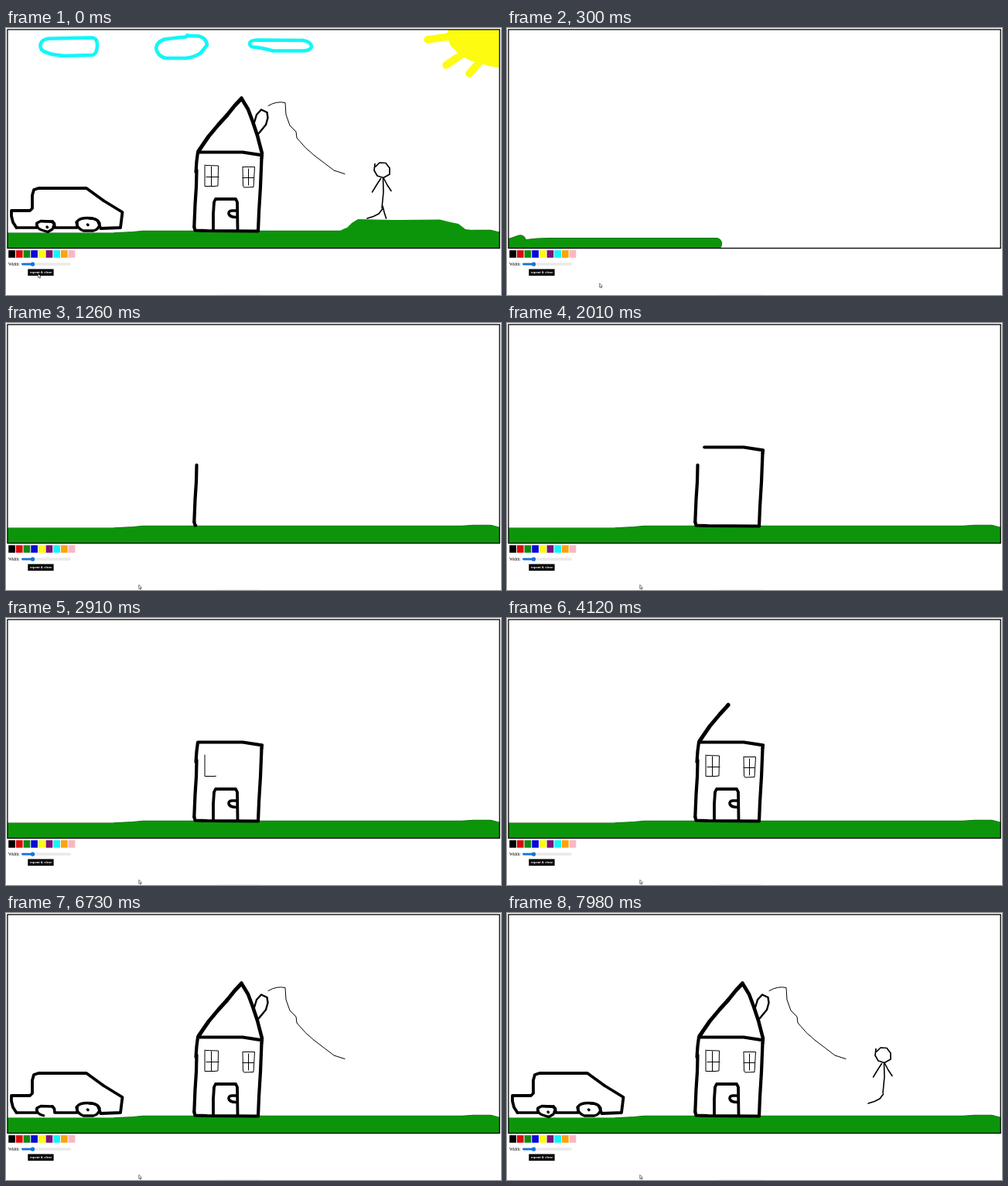
An HTML page that plays this animation: 640x345 px, repeating every 8 s.

```html
<!DOCTYPE html>
<html lang="en">
<head>
<meta charset="utf-8">
<title>Drawing replay</title>
<style>
  html, body { margin: 0; width: 100%; height: 100%; overflow: hidden; background: #fff; }
  svg { display: block; width: 100vw; height: 100vh; }
  .pen { fill: none; stroke-linecap: round; stroke-linejoin: round; }
</style>
</head>
<body>
<svg viewBox="0 0 640 345">
  <defs><clipPath id="sheet"><rect x="2" y="2" width="636" height="282.5"/></clipPath></defs>
  <rect width="640" height="345" fill="#fff"/>
  <g clip-path="url(#sheet)">
    <g id="edge" class="pen" stroke="#075c07" stroke-width="15.6"></g>
    <g id="grass" class="pen" stroke="#0c950a" stroke-width="14.6"></g>
    <g id="ink" class="pen" stroke="#000"></g>
    <g id="extras" class="pen">
      <path fill="#0c950a" d="M432 268V262Q437 259 441 258L447 252 455 247 500 248 561 247.5 575 251 585 253 594 260 608 261.500 638 263V270Z"/>
      <path stroke="#000" stroke-width="1.6" d="M487 230L489 238 491.500 246"/>
      <g stroke="#12f6f8" stroke-width="4.6">
        <path d="M46 18Q49 13 62 13.500L111 12.500Q118 13 118 22Q118 33 112 35L75 36Q52 34 46 28Q43 23 46 18Z"/>
        <path d="M241 10.500L234 9.500Q236 12 226 12L205 14.500Q195 18 194 26Q196 37 207 39L233 39Q246 37 252 32L260 22Q259 13 249 10.500L236 10"/>
        <path d="M315 20Q315 16 325 15.500L384 16Q395 18 395 24Q394 29 385 29.500L345 29.500Q329 25 319 24.500Q315 23 315 20Z"/>
      </g>
      <g stroke="#fcfb10" stroke-width="9.500">
        <path fill="#fcfb10" stroke-width="3" d="M574 0L571 10 576 22 585 31 599 40 614 44 626 48 640 50V0Z"/>
        <path d="M545 15L574 11M569 48L594 31M599 59L614 42"/>
      </g>
    </g>
  </g>
  <rect x="1.900" y="2" width="636.300" height="282.500" fill="none" stroke="#000" stroke-width="1.300"/>
  <g id="swatches"></g>
  <text x="3" y="306.800" font-size="5.400" font-family="'Liberation Serif', serif">Width:</text>
  <rect x="20.300" y="303.900" width="63" height="2.400" rx="1.200" fill="#efefef" stroke="#c4c4c4" stroke-width=".4"/>
  <rect x="20" y="303.700" width="15" height="2.800" rx="1.400" fill="#1474dc"/>
  <circle cx="34.500" cy="305.200" r="2.600" fill="#1474dc"/>
  <rect x="28.300" y="311.500" width="33.300" height="8.600" fill="#000"/>
  <text x="45" y="317.300" font-size="4.300" font-weight="700" text-anchor="middle" fill="#fff" font-family="'Liberation Sans', sans-serif">repeat &amp; clear</text>
  <path d="M273 344.700H330" stroke="#e6e6e6" stroke-width=".6"/>
  <path id="cursor" d="M0 0V5.200L1.200 4.100 2 6 2.900 5.600 2.100 3.800 3.700 3.700Z" fill="#fff" stroke="#222" stroke-width=".6"/>
</svg>
<script>
const LOOP = 8000, CLEAR = 150, STEP = 50;
const $ = id => document.getElementById(id);

function add(parent, tag, attrs) {
  const el = document.createElementNS('http://www.w3.org/2000/svg', tag);
  for (const k in attrs) el.setAttribute(k, attrs[k]);
  return parent.appendChild(el);
}

['#000', '#d90d0d', '#118a11', '#0808dc', '#fcfb10', '#7a117a', '#12f6f8', '#fca40a', '#fbb6c4']
  .forEach((fill, i) => add($('swatches'), 'rect', { x: 3.2 + i * 9.68, y: 287.2, width: 8.7, height: 9.6, fill }));

// Each stroke is drawn along its path between two times.
const strokes = [];
function stroke(parent, d, from, to, width) {
  const el = add(parent, 'path', width ? { d, 'stroke-width': width } : { d });
  strokes.push({ el, from, to, len: el.getTotalLength() });
}
const ink = (width, from, to, d) => stroke($('ink'), d, from, to, width);
function ground(from, to, d) {
  stroke($('edge'), d, from, to);
  stroke($('grass'), d, from, to);
}

// ground
ground(150, 550, 'M17 275L10 277.500 0 281 28 280.500 40 279.200 55 278.700H617L630 277 641 278.500');
ground(555, 1030, 'M641 278L638 271.700 626 268.600H605L590 269.500H178L165 270.700 140 272 0 272.300');

// walls and door
ink(4.2, 1050, 1260, 'M246.500 183.500L246 205 244.500 228 243.300 257');
ink(4.2, 1260, 1760, 'M243.300 257L244.500 261.500 260 262 326 262.500 327 238 329 205 330.500 168');
ink(4.2, 1770, 2130, 'M330.500 168L331 164.300 306 160.500H248L246.500 172 245.500 186');
ink(3.8, 2170, 2590, 'M268 261V240L269 225 271 221H297L299 225 299.500 261');
ink(3.6, 2640, 2760, 'M298 236H292Q287.500 236.500 288 240Q289 244.500 298 244.500');

// windows
ink(1, 2770, 2900, 'M257 177V204.500H269');
ink(1, 2910, 3210, 'M269 204.500L274 204 274.500 178 258 177.500');
ink(1, 3240, 3350, 'M265.500 179V204');
ink(1, 3370, 3450, 'M259 192.500H275');
ink(1, 3500, 3710, 'M306 180L306.500 204 308 206 320 205.500 321.500 179.500 306 179.500');
ink(1, 3720, 3780, 'M313.500 182V203');
ink(1, 3790, 3840, 'M306 193.500H320.500');

// roof, chimney, smoke
ink(5, 3860, 4120, 'M249 159L262 140 275 124.500 285.500 113');
ink(5, 4120, 4260, 'M285.500 113L296 100 304.500 91');
ink(4.6, 4270, 4530, 'M304.500 91L313 105 319 121 325 139 331 162');
ink(2.4, 4550, 4700, 'M321 122L324 112 330 105.500 337.500 109 338.500 116 336 125 326.500 136.500');
ink(1, 4710, 5000, 'M339 100.500Q350 94 361 96.500L362 112 367 126 375 134 376 142Q387 156 399 165T424 184L438 188.500');

// car
ink(3.6, 5010, 5150, 'M13.500 258H40V252L45 249.500 60 250');
ink(3.6, 5150, 5570, 'M60 250L62.500 253 63 258H92V250Q95 245.500 105 245.500Q117 245.500 119 250L122.500 259');
ink(3.8, 5570, 5920, 'M122.500 259L148 258 150.500 238 126 223');
ink(3.8, 5960, 6400, 'M126 223L104 207H42L36 209 34 216V233L31 236H7V243L9 251 13.500 258');
ink(3.3, 6420, 6610, 'M91 251Q92 259 100 262H113Q121 260 121 252Q118 246 108 246');
ink(3.4, 6620, 6650, 'M105.500 254L106 254.500');
ink(3.2, 6670, 6860, 'M39.500 253Q40 259 46 261L54 263.500 60 260 62.500 253Q60 249.500 50 250');
ink(3.4, 6880, 6920, 'M53 257L53.500 257.500');

// figure
ink(1.7, 6960, 7250, 'M477 175.500L476 184 480 191 488 193.500 496 189V181L491 174.500 483 174 478 179');
ink(1.6, 7290, 7420, 'M484.500 194.500L479 203 473.500 212');
ink(1.6, 7480, 7670, 'M488.500 194.500L493 203 498 210.500');
ink(1.6, 7690, 7850, 'M487.500 194L488 212 486 232.500');
ink(1.7, 7860, 7970, 'M486.500 234L482 240 475 243.500 467 246');

const progress = (t, a, b) => Math.min(1, Math.max(0, (t - a) / (b - a)));

function draw(time) {
  const t = Math.floor(time / STEP) * STEP;
  const full = time < CLEAR;
  for (const s of strokes) {
    const p = full ? 1 : progress(t + 25, s.from, s.to);
    s.el.style.display = p ? '' : 'none';
    s.el.style.strokeDasharray = p < 1 ? `${s.len * p} ${s.len + 50}` : 'none';
  }
  $('extras').style.display = full ? '' : 'none';
  const m = full ? 0 : progress(t, 150, 400);
  $('cursor').setAttribute('transform', `translate(${41.5 + 130.3 * m} ${317.5 + 20.8 * m})`);
}

const start = performance.now();
function tick() {
  draw((performance.now() - start) % LOOP);
  requestAnimationFrame(tick);
}
tick();
</script>
</body>
</html>
```
